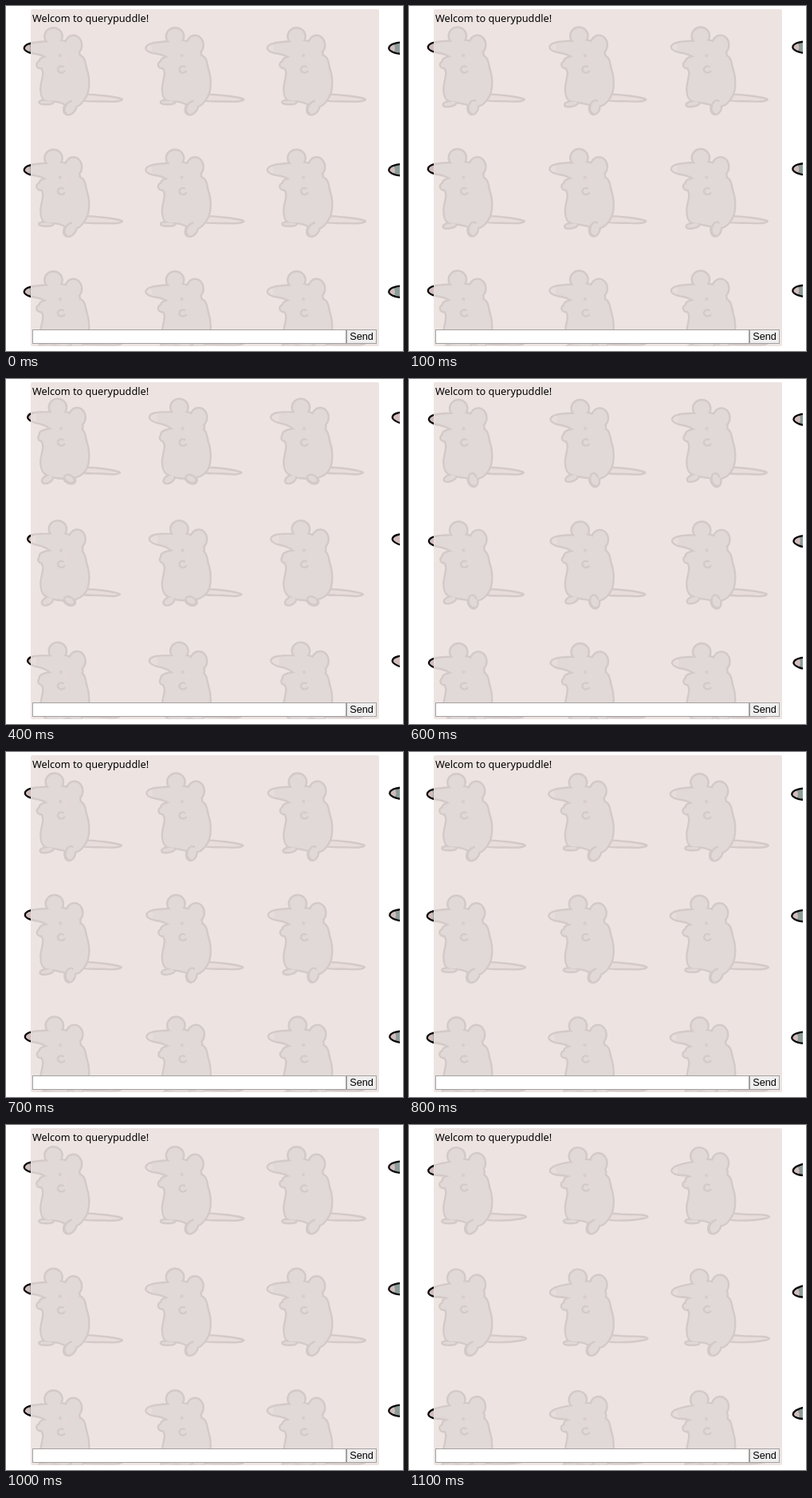
Recreate the animation shown at these times as an HTML page with a canvas. Size 498 by 432 pixels, loop 1.2 s.

```html
<!DOCTYPE html>
<html lang="en">
<head>
<meta charset="utf-8">
<title>Chat</title>
<style>
html, body { margin: 0; width: 100%; height: 100%; overflow: hidden; background: #fff; }
body * { position: absolute; box-sizing: border-box; }
canvas { left: 0; top: 0; }
.panel { left: 30.5px; top: 4px; width: 437px; height: 421.5px; border-radius: 2px; background: rgba(235, 225, 223, .894); }
.greeting { left: 33px; top: 7px; font: 12.7px/17px "Noto Sans", "Open Sans", sans-serif; white-space: nowrap; color: #000; }
.field, .send { top: 405px; height: 18px; border: 1px solid #a3a0a0; }
.field { left: 33px; width: 394px; background: #fff; }
.send { left: 427px; width: 38px; background: #efefef; text-align: center; font: 12.7px/17px "Liberation Sans", Arial, sans-serif; color: #000; }
</style>
</head>
<body>
<canvas width="498" height="432"></canvas>
<div class="panel"></div>
<div class="greeting">Welcom to querypuddle!</div>
<div class="field"></div>
<div class="send">Send</div>
<script>
const ctx = document.querySelector('canvas').getContext('2d');
const TILE = 152.5, STEP = 100, STEPS = 12, LINE = 2.4;
const lerp = (a, b, t) => a + (b - a) * t;

function ellipse(x, y, rx, ry = rx, tilt = 0, from = 0, to = 2 * Math.PI) {
  const path = new Path2D();
  path.ellipse(x, y, rx, ry, tilt, from, to);
  return path;
}

// Smooth closed path through x,y pairs.
function blob(...pts) {
  const n = pts.length / 2, path = new Path2D();
  const at = i => [pts[2 * (i % n)], pts[2 * (i % n) + 1]];
  path.moveTo(...at(0));
  for (let i = 0; i < n; i++) {
    const [p, a, b, q] = [at(i + n - 1), at(i), at(i + 1), at(i + 2)];
    path.bezierCurveTo(a[0] + (b[0] - p[0]) / 6, a[1] + (b[1] - p[1]) / 6,
      b[0] - (q[0] - a[0]) / 6, b[1] - (q[1] - a[1]) / 6, ...b);
  }
  path.closePath();
  return path;
}

function join(parts, matrix) {
  const path = new Path2D();
  for (const part of parts) path.addPath(part, matrix);
  return path;
}

function fill(path, color) {
  ctx.fillStyle = color;
  ctx.fill(path);
}

function stroke(path, width = LINE) {
  ctx.lineWidth = width;
  ctx.stroke(path);
}

// Sway stretches the rat up and to the right; nod tips the nose down.
function makeRat(sway, nod) {
  const plant = Math.sin(sway * Math.PI / 2);
  const tipX = 298.5 - 3 * plant + nod, tipY = 117 - 2 * nod;
  const turn = new DOMMatrix()
    .translate(220 + 4.5 * sway + nod, 50 - 2 * sway)
    .rotate(4 * sway - 6 * nod)
    .translate(-220, -50);
  const head = join([
    blob(176.5,53, 183,48, 203,45.5, 226,45, 244,60, 230,76, 198,61, 183,57.5)
  ], turn);
  const ears = join([ellipse(212, 38, 10, 9.6), ellipse(237, 49, 9.5, 11)], turn);
  const body = blob(243,62, 253,80, 255.5,98, 252,113, 240,lerp(125, 122, sway),
    217,lerp(119, 123, plant), 201,117, 197,104, 200,84, 198,66);
  const paw = ellipse(196 + 2 * sway, 73.5 + nod, 4, 3.5);
  const leftFoot = ellipse(lerp(203, 204.5, plant), lerp(120.5, 125.5, plant),
    lerp(8, 6.5, plant), lerp(1.6, 3.5, plant), -.5 * plant);
  const foot = [lerp(233, 232, sway) - 2 * nod, lerp(127, 125, sway),
    lerp(9, 7, sway), lerp(6, 4.5, sway), lerp(2.19, .5, sway)];
  return {
    head, turn, sway,
    shape: join([head, ears, body, paw, leftFoot, ellipse(...foot)]),
    tail: blob(250,111, 272,112, tipX - 8,tipY - 2.5, tipX,tipY, tipX - 8,tipY + 2.5,
      272,119.5 - sway, 250,118.5 - sway),
    lines: join([
      ellipse(...foot, 0, Math.PI * lerp(.8, 2, sway)),
      ellipse(222, 79.5 - nod, 4.6, 4, 0, .6, 5.2)
    ]),
    eye: ellipse(220.5 + sway, 62 + nod, 2.2),
    blush: ellipse(227 + sway, 67 + nod, 3)
  };
}

function drawRat(rat) {
  fill(rat.tail, '#cdb9b8');
  stroke(rat.tail);
  // Filling over a doubled stroke leaves one outline around all parts.
  stroke(rat.shape, 2 * LINE);
  fill(rat.shape, '#8c9c98');
  ctx.save();
  ctx.clip(rat.head);
  fill(join([ellipse(174, 53, 9 + 3 * rat.sway ** 2)], rat.turn), '#d2bcbc');
  ctx.restore();
  fill(rat.blush, '#a89492');
  fill(rat.eye, '#333');
  stroke(rat.lines);
}

function draw(time) {
  const step = Math.floor(time / STEP) % STEPS;
  const sway = Math.max(0, 1 - Math.abs(step - 4) / 4);
  const rat = makeRat(sway, step === STEPS - 1 ? 1 : 0);
  ctx.clearRect(0, 0, 498, 432);
  ctx.save();
  ctx.beginPath();
  ctx.rect(0, 0, 494, 425.5);
  ctx.clip();
  ctx.lineCap = ctx.lineJoin = 'round';
  ctx.strokeStyle = '#080506';
  for (let row = 0; row < 3; row++) {
    for (let col = -1; col < 3; col++) {
      ctx.save();
      ctx.translate(col * TILE, row * TILE);
      drawRat(rat);
      ctx.restore();
    }
  }
  ctx.restore();
}

const start = performance.now();
function tick() {
  draw(performance.now() - start);
  requestAnimationFrame(tick);
}
tick();
</script>
</body>
</html>
```
